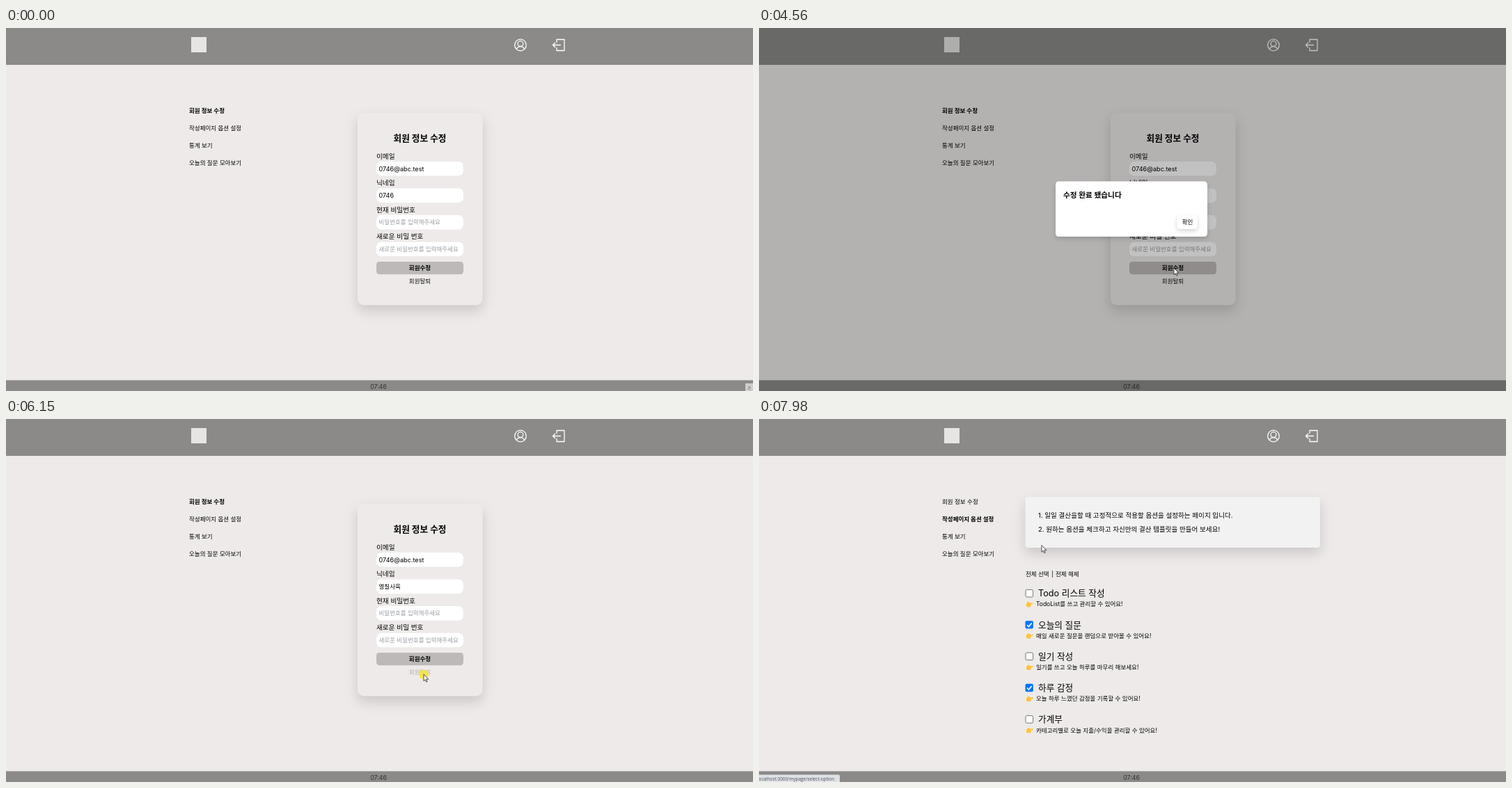
An HTML page for the animation above (8000 ms loop, 1073 by 522 pixels).

```html
<!DOCTYPE html>
<html lang="ko">
<head>
<meta charset="utf-8">
<style>
  html, body { margin: 0; width: 100%; height: 100%; overflow: hidden; background: #edeae9; }
  svg { display: block; width: 100vw; height: 100vh; }
  text { font-family: Inter, "Noto Sans CJK KR", "Noto Sans CJK", sans-serif; white-space: pre; }
  .card { filter: drop-shadow(0 8px 9px rgba(0,0,0,.15)); }
  .soft { filter: drop-shadow(0 3px 3px rgba(0,0,0,.16)); }
  .line { fill: none; stroke: #fff; stroke-width: 1.3; stroke-linecap: round; stroke-linejoin: round; }
  #cursor path { fill: #fff; stroke: #222; stroke-width: .8; stroke-linejoin: round; }
  #cursor #ibeam { fill: none; stroke-width: 1; }
</style>
</head>
<body>
<svg id="stage" viewBox="0 0 1073 522" preserveAspectRatio="none"></svg>
<script>
const LOOP = 8000, STEP = 30;
const stage = document.getElementById('stage');
const $ = id => document.getElementById(id);

// Text is placed by its left (or middle) edge and its visual centre line.
const text = (x, cy, size, str, attrs = '') =>
  `<text x="${x}" y="${cy + size * .37}" font-size="${size}" ${attrs}>${str}</text>`;
const rect = (x, y, w, h, r, fill, attrs = '') =>
  `<rect x="${x}" y="${y}" width="${w}" height="${h}" rx="${r}" fill="${fill}" ${attrs}/>`;
const BOLD = 'font-weight="700"', MID = 'text-anchor="middle"', HINT = 'fill="#9a9da3"';

const header = rect(0, 0, 1073, 53, 0, '#8b8a89') + rect(0, 506.5, 1073, 16, 0, '#8b8a89')
  + rect(266, 13, 22, 22, 0, '#e6e5e4')
  + `<g class="line"><circle cx="739" cy="24.5" r="8.3"/><circle cx="739" cy="22.6" r="3.9"/>
     <path d="M733.4 30.4Q735 26.7 739 26.7T744.6 30.4M791 20.5V16.5H802V32.5H791V28.5M796.5 24.5H785.5M788.7 21.3L785.5 24.5L788.7 27.7"/></g>`
  + text(535, 516.2, 8.8, '07:46', MID + ' fill="#333"');

const menu = ['회원 정보 수정', '작성페이지 옵션 설정', '통계 보기', '오늘의 질문 모아보기']
  .map((s, i) => text(263, 118.8 + 25 * i, 8.5, s, `id="menu${i}"`)).join('');

const fields = ['이메일', '닉네임', '현재 비밀번호', '새로운 비밀 번호'].map((s, i) =>
  text(532, 184 + 38.5 * i, 9.65, s) + rect(532, 192 + 38.55 * i, 125, 20.6, 7, '#fff')).join('');

const dots = Array.from({ length: 6 }, (_, i) =>
  `<circle class="dot" cx="${537.8 + 4.7 * i}" cy="279.8" r="1.7"/>`).join('');

const profile = `<g id="profile">
  ${rect(505, 122, 179.5, 276.5, 9, '#edeae9', 'class="card"')}
  ${text(594.5, 158, 12.7, '회원 정보 수정', MID + BOLD)}
  ${fields}
  ${text(535.5, 202.2, 9.1, '0746@abc.test')}
  <rect id="selection" x="535" y="235" width="23" height="11" fill="#3390ff"/>
  ${text(535.5, 240.6, 9, '', 'id="nick"')}
  <path id="compose" stroke="#222" stroke-width=".8"/>
  ${text(535.5, 279.2, 8.5, '비밀번호를 입력해주세요', HINT + ' id="hint"')}
  ${dots}
  ${text(535.5, 317.8, 8.5, '새로운 비밀번호를 입력해주세요', HINT)}
  <path id="caret" stroke="#111" stroke-width=".9"/>
  ${rect(532, 336, 125, 18.3, 4.5, '#bdb9b8')}
  ${text(594.5, 345.1, 8.5, '회원수정', MID + BOLD)}
  ${text(594.5, 363.7, 8.5, '회원탈퇴', MID + ' id="leave"')}
</g>`;

const finger = y => `<path transform="translate(384 ${y})" fill="#ffc43a"
  d="M0-1L3-4Q5-4 4.6-2.2H9.4Q10.6-1.2 9.4-.3H6.6Q7.3.5 6.6 1.2Q7 2 6.2 2.5Q6.4 3.8 5 3.8H2.6Q1 3.8 0 2.6Z"/>`;

const option = ([title, note, checked], i) => {
  const y = 250.6 + 45.3 * i;
  const box = checked
    ? rect(382.5, y - 5.7, 11.4, 11.4, 2, '#0075ff')
      + `<path d="M385 ${y + .2}l2.4 2.6 4.3-5.3" fill="none" stroke="#fff" stroke-width="1.7"/>`
    : rect(383, y - 5.2, 10.6, 10.6, 1.8, '#fff', 'stroke="#767676"');
  return box + text(401, y, 12.7, title) + finger(y + 16) + text(398, y + 15.7, 8.5, note);
};

const options = `<g id="options">
  ${rect(382.5, 112, 423.5, 73, 4.5, '#f3f2f2', 'class="card"')}
  ${text(401, 138.3, 9.55, '1. 일일 결산을할 때 고정적으로 적용할 옵션을 설정하는 페이지 입니다.')}
  ${text(401, 158.6, 9.55, '2. 원하는 옵션을 체크하고 자신만의 결산 템플릿을 만들어 보세요!')}
  ${text(383, 223, 8.5, '전체 선택')}${text(420.2, 223, 8.5, '|')}${text(426, 223, 8.5, '전체 해제')}
  ${[
    ['Todo 리스트 작성', 'TodoList를 쓰고 관리할 수 있어요!', false],
    ['오늘의 질문', '매일 새로운 질문을 랜덤으로 받아볼 수 있어요!', true],
    ['일기 작성', '일기를 쓰고 오늘 하루를 마무리 해보세요!', false],
    ['하루 감정', '오늘 하루 느꼈던 감정을 기록할 수 있어요!', true],
    ['가계부', '카테고리별로 오늘 지출/수익을 관리할 수 있어요!', false],
  ].map(option).join('')}
</g>`;

const dialogButton = (x, label) =>
  rect(x - 14.5, 269.5, 29.5, 19.5, 4, '#fff', 'class="soft"') + text(x + .5, 279.2, 8.5, label, MID);
const dialog = `<g id="dialog">
  ${rect(0, 0, 1073, 522, 0, '#000', 'opacity=".245"')}
  ${rect(426, 220.5, 218, 79.5, 4.5, '#fff', 'class="soft"')}
  ${text(437, 240, 10.7, '', BOLD + ' id="message"')}
  <g id="cancel">${dialogButton(582, '취소')}</g>${dialogButton(615, '확인')}
</g>`;

const extras = `<g id="ime">${rect(1062, 511, 11, 11, 0, '#cfcecd')}${text(1067.5, 517.5, 6, '가', MID + ' fill="#666"')}</g>
  <g id="status">${rect(-3, 511.5, 119, 13, 2, '#dee1e6')}
  ${text(-2, 517.2, 6.4, 'localhost:3000/mypage/select-option', 'fill="#4d5156" style="font-family:\'Open Sans\',sans-serif"')}</g>`;

const pointer = `<g id="cursor">
  <circle id="halo" r="7" cy=".5" fill="#f5e62e" opacity=".8"/>
  <path id="arrow" d="M0 0V9.8L2.2 7.8L3.7 11.2L5.2 10.5L3.7 7.2H6.8Z"/>
  <path id="hand" d="M-1 0Q.2-1.2 1.2 0V4.2Q2.3 3.3 3.1 4.5Q4.3 3.8 5 5Q6.5 4.6 6.7 6V9Q6.7 10.5 5.6 12H.4L-3.4 7.4Q-3.2 5.8-1 7.2Z"/>
  <path id="ibeam" d="M-2-4.5H-.6L0-4L.6-4.5H2M0-4V4M-2 4.5H-.6L0 4L.6 4.5H2"/>
</g>`;

stage.innerHTML = header + menu + profile + options + dialog + extras + pointer;

// Pointer stops: time, x, y
const path = [
  [0, 1095, 540], [30, 1066, 514], [420, 630, 352], [660, 630, 352], [780, 606, 240], [930, 606, 240],
  [1110, 581, 240.5], [2100, 581, 240.5], [2190, 612, 278], [2910, 612, 278], [3180, 590, 322],
  [4050, 590, 322], [4230, 596, 345], [4560, 596, 345], [4800, 624, 281], [5220, 624, 281],
  [5880, 600, 367], [6420, 600, 367], [6600, 588, 279], [7200, 588, 279], [7560, 310, 146],
  [7740, 310, 146], [7980, 406, 181.5],
];
const clicks = [[1140, 1230], [1260, 1350], [2430, 2550], [3450, 3630], [4260, 4380], [4860, 4950],
  [6120, 6240], [6780, 6900], [7620, 7740]];
const typed = ['ㅇ', '여', '영', '영ㅊ', '영치', '영칠', '영칠ㅅ', '영칠사', '영칠사ㅇ', '영칠사유', '영칠사육'];

const within = (v, a, b) => v >= a && v < b;
const show = (el, on) => el.setAttribute('display', on ? 'inline' : 'none');

function pointerAt(t) {
  const i = path.findIndex(p => p[0] > t);
  if (i < 0) return path[path.length - 1].slice(1);
  const [t0, x0, y0] = path[i - 1], [t1, x1, y1] = path[i];
  const u = (t - t0) / (t1 - t0), e = u * u * (3 - 2 * u);
  return [x0 + (x1 - x0) * e, y0 + (y1 - y0) * e];
}

function cursorShape(x, y, open, onOptions) {
  if (open) return within(y, 269, 290) && within(x, 567, 631) ? 'hand' : 'arrow';
  if (within(x, 263, 339) && within(y, 112, 200)) return 'hand';
  if (onOptions || !within(x, 532, 657)) return 'arrow';
  if (within(y, 336, 354)) return 'hand';
  return within(y, 192, 328) && (y - 192) % 38.55 < 20.6 ? 'ibeam' : 'arrow';
}

function drawNickname(t) {
  const step = Math.floor((t - 1530) / 60);
  const value = step < 0 ? '0746' : typed[Math.min(step, typed.length - 1)];
  const selected = within(t, 1260, 1530);
  $('nick').textContent = value;
  $('nick').setAttribute('font-size', step < 0 ? 9 : 8.5);
  $('nick').setAttribute('fill', selected ? '#fff' : '#000');
  show($('selection'), selected);
  const end = 535.7 + value.length * 7.82;
  show($('compose'), within(t, 1530, 2430));
  $('compose').setAttribute('d', `M${end - 7.6} 246H${end}`);
  return end;
}

function drawCaret(t, nickEnd, dotCount) {
  const [x, y] = t < 2430 ? [nickEnd + .4, 240.6] : t < 3450 ? [536 + dotCount * 4.7, 279.2] : [536, 317.8];
  show($('caret'), within(t, 1530, 3870));
  $('caret').setAttribute('d', `M${x} ${y - 5.3}v10.6`);
}

function draw(now) {
  const t = Math.floor((now % LOOP) / STEP) * STEP;
  const [x, y] = pointerAt(t);
  const onOptions = t >= 7740;
  const saved = within(t, 4440, 4950), leaving = within(t, 6210, 6900), open = saved || leaving;

  show($('profile'), !onOptions);
  show($('options'), onOptions);
  $('menu0').setAttribute('font-weight', onOptions ? 400 : 700);
  $('menu1').setAttribute('font-weight', onOptions ? 700 : 400);

  const nickEnd = drawNickname(t);
  const dotCount = within(t, 2550, 4950) ? Math.min(6, 1 + Math.floor((t - 2550) / 60)) : 0;
  document.querySelectorAll('.dot').forEach((dot, i) => show(dot, i < dotCount));
  show($('hint'), !dotCount);
  drawCaret(t, nickEnd, dotCount);
  const overLeave = !open && within(x, 578, 611) && within(y, 358, 370);
  $('leave').setAttribute('fill', overLeave ? '#b0adac' : '#111');

  show($('dialog'), open);
  show($('cancel'), leaving);
  $('message').textContent = leaving ? '정말 탈퇴 하시겠습니까?' : '수정 완료 됐습니다';
  $('dialog').setAttribute('opacity', Math.min(1, (t - (saved ? 4440 : 6210) + STEP) / (saved ? 120 : 60)));

  show($('ime'), t < 60);
  show($('status'), t >= 7560);
  $('cursor').setAttribute('transform', `translate(${x} ${y})`);
  show($('halo'), clicks.some(([a, b]) => within(t, a, b)));
  const shape = cursorShape(x, y, open, onOptions);
  ['arrow', 'hand', 'ibeam'].forEach(id => show($(id), id === shape));
  requestAnimationFrame(() => draw(performance.now() - start));
}

const start = performance.now();
draw(0);
</script>
</body>
</html>
```
